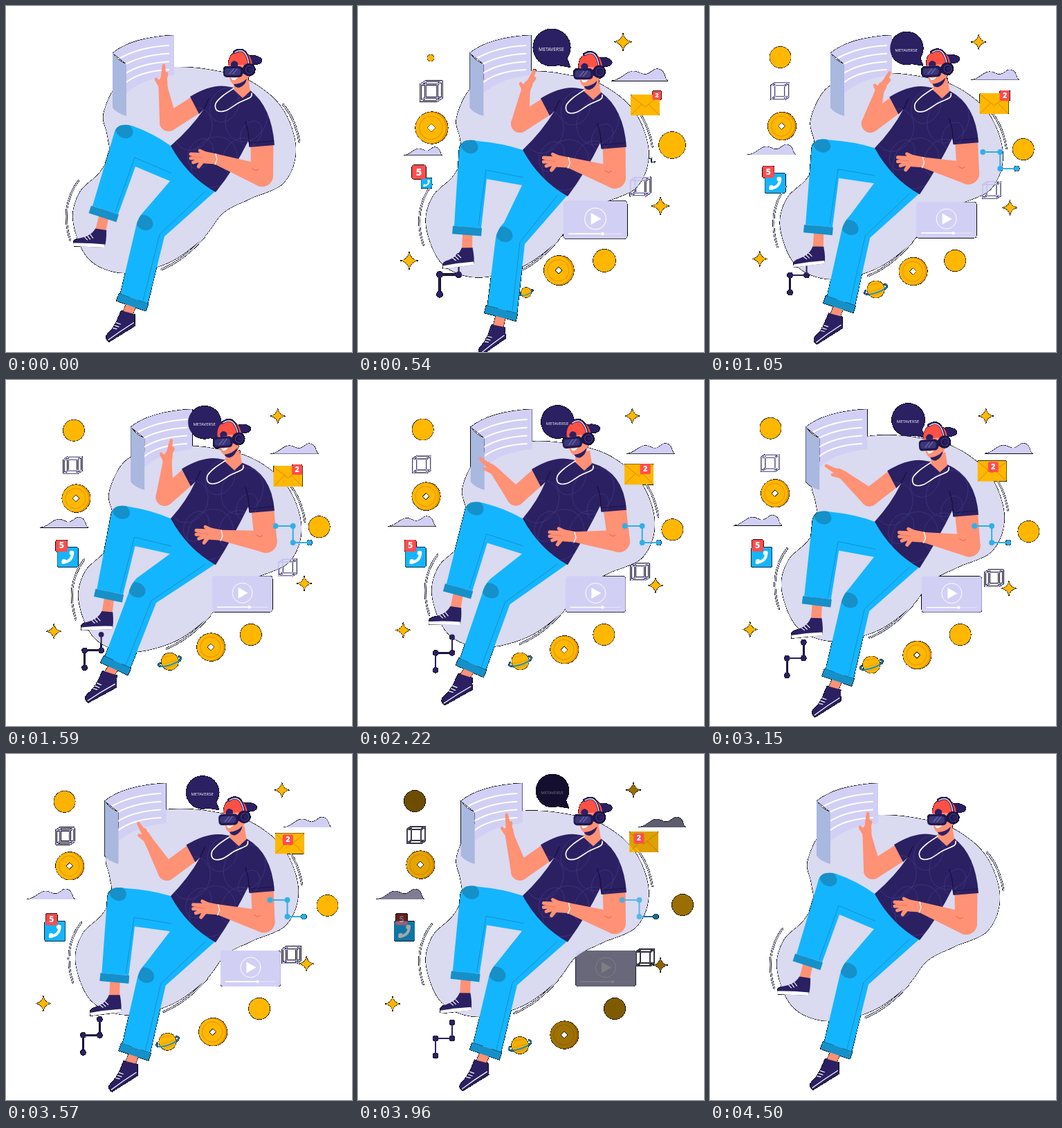
These frames come from a looping animation (500x500 px, 4530 ms). An HTML page with a canvas:

```html
<!DOCTYPE html>
<html lang="en">
<head>
<meta charset="utf-8">
<style>
html, body { margin: 0; width: 100%; height: 100%; overflow: hidden; background: #fff; }
canvas { display: block; width: 500px; height: 500px; }
</style>
</head>
<body>
<canvas id="stage" width="500" height="500"></canvas>
<script>
const LOOP = 4530, CYCLE = 4500, STEP = 30, SIZE = 500;
const ENTER = 540, LEAVE = 3960;
const POSES = [0, 540, 1590, 2220, 3150, 3960, CYCLE];
const NAVY = '#2b2062', DARK = '#17103f', SKIN = '#ff9175', BLUE = '#14b5ff', TEAL = '#1590c8',
  AMBER = '#ffb700', RUST = '#e89a00', RED = '#ff4d4d', LILAC = '#d2cff5', WHITE = '#fff';

const out = document.getElementById('stage').getContext('2d');
const makeLayer = () => {
  const cv = document.createElement('canvas');
  cv.width = cv.height = SIZE;
  return cv.getContext('2d', { willReadFrequently: true });
};
const scene = makeLayer(), layer = makeLayer();
let c = scene, now = 0;
// sway: slow lean to the left and back, bob: up and down,
// drop: near leg sinking, kick: far leg swinging, reach: arm stretching to the page
let sway, bob, drop, kick, reach;

// ---- motion ----
const clamp = u => Math.max(0, Math.min(1, u));
const ease = u => { u = clamp(u); return u * u * (3 - 2 * u); };

// Smooth periodic curve that starts from rest value 0 and passes through one value per pose.
function through(...keys) {
  const v = [0, ...keys, 0], n = POSES.length - 1;
  let i = 0;
  while (i < n - 1 && now >= POSES[i + 1]) i++;
  const span = k => POSES[k + 1] - POSES[k], slope = k => (v[k + 1] - v[k]) / span(k);
  const tangent = k => {
    const a = (k - 1 + n) % n, b = k % n;
    return (slope(a) * span(b) + slope(b) * span(a)) / (span(a) + span(b));
  };
  const u = (now - POSES[i]) / span(i), w = 1 - u;
  return v[i] * w * w * (1 + 2 * u) + v[i + 1] * u * u * (3 - 2 * u)
    + span(i) * u * w * (tangent(i) * w - tangent(i + 1) * u);
}
function move(t) {
  now = t;
  const turn = 2 * Math.PI * t / CYCLE;
  sway = (1 - Math.cos(turn)) / 2;
  bob = Math.sin(turn);
  drop = through(1, .45, .2, .8, .85);
  kick = through(1, -1, -.8, .1, .08);
  reach = through(-.45, -.18, .85, 1, .22);
}
const add = (p, x, y) => [p[0] + x, p[1] + y];
const mid = (a, b) => [(a[0] + b[0]) / 2, (a[1] + b[1]) / 2];
const shifted = (dx, dy) => (x, y) => [x + dx, y + dy];

// ---- drawing helpers ----
function fill(color) { c.fillStyle = color; c.fill(); }
function stroke(color, w) {
  c.strokeStyle = color; c.lineWidth = w;
  c.lineCap = c.lineJoin = 'round';
  c.stroke();
}
function trace(pts, closed) {
  c.beginPath();
  pts.forEach(p => c.lineTo(...p));
  if (closed) c.closePath();
}
const poly = (pts, color) => { trace(pts, true); fill(color); };
const line = (pts, color, w) => { trace(pts); stroke(color, w); };
function disc(x, y, r, color) { c.beginPath(); c.arc(x, y, r, 0, 7); fill(color); }
function ring(x, y, r, color, w) { c.beginPath(); c.arc(x, y, r, 0, 7); stroke(color, w); }
function oval(x, y, rx, ry, a, color) { c.beginPath(); c.ellipse(x, y, rx, ry, a, 0, 7); fill(color); }
function box(x, y, w, h, r, color) { c.beginPath(); c.roundRect(x, y, w, h, r); fill(color); }
const shape = (d, color) => { c.fillStyle = color; c.fill(new Path2D(d)); };
function wire(d, color, w) {
  c.strokeStyle = color; c.lineWidth = w; c.lineCap = c.lineJoin = 'round';
  c.stroke(new Path2D(d));
}
function smooth(pts, closed) {
  const n = pts.length;
  const get = i => closed ? pts[(i + n) % n] : pts[Math.max(0, Math.min(n - 1, i))];
  c.beginPath();
  c.moveTo(...pts[0]);
  for (let i = 0; i < (closed ? n : n - 1); i++) {
    const [a, b, d, e] = [get(i - 1), get(i), get(i + 1), get(i + 2)];
    c.bezierCurveTo(b[0] + (d[0] - a[0]) / 6, b[1] + (d[1] - a[1]) / 6,
      d[0] - (e[0] - b[0]) / 6, d[1] - (e[1] - b[1]) / 6, ...d);
  }
}
function limb(a, ra, b, rb) {
  const dir = Math.atan2(b[1] - a[1], b[0] - a[0]), q = Math.PI / 2;
  c.beginPath();
  c.arc(...a, ra, dir + q, dir + 3 * q);
  c.arc(...b, rb, dir - q, dir + q);
  fill(SKIN);
}
function label(s, x, y, font) {
  c.font = font; c.fillStyle = WHITE;
  c.textAlign = 'center'; c.textBaseline = 'middle';
  c.fillText(s, x, y);
}
function within(x, y, draw) { c.save(); c.translate(x, y); draw(); c.restore(); }

// ---- backdrop ----
function blob() {
  smooth([[141, 155], [162, 112], [200, 94], [245, 88], [295, 92], [350, 107], [398, 146], [419, 205],
    [402, 255], [352, 279], [314, 299], [285, 335], [235, 371], [170, 386], [120, 366], [97, 312],
    [106, 270], [135, 241], [149, 213], [146, 185]], true);
  fill('#dadaf1');
  wire('M400 142Q418 162 424 197M105 252Q77 290 93 339M224 381Q258 367 287 333', '#dadaf1', 2);
}
function book() {
  shape('M154 68Q182 45 243 42V100Q198 104 174 126V84Z', LILAC);
  for (let i = 0; i < 4; i++) {
    const y = i * 11.7;
    wire(`M${165 + i * 3} ${75 + y}Q195 ${59 + y} 235 ${57 + y}`, WHITE, 2);
  }
  shape('M154 67Q160 78 174 84V159Q160 155 154 147Z', '#a9b8df');
}

// ---- floating items, drawn around their own centre ----
const plainCoin = () => disc(0, 0, 15.5, AMBER);
const holedCoin = () => {
  disc(.7, 0, 20.3, RUST);
  disc(-1.2, 0, 19, AMBER);
  ring(-.5, 0, 14.5, RUST, 1.2);
  c.globalCompositeOperation = 'destination-out';
  poly([[-5, 0], [0, -5], [5, 0], [0, 5]], '#000');
  c.globalCompositeOperation = 'source-over';
};
const star = () => shape('M0-11Q1.5-1.5 11 0Q1.5 1.5 0 11Q-1.5 1.5-11 0Q-1.5-1.5 0-11Z', AMBER);
const cube = () => wire('M-13-8H7V12H-13ZM-7-12H13V8H-7ZM-13-8L-7-12M7-8L13-12M7 12L13 8M-13 12L-7 8', '#c6c1f0', 1.6);
const cloud = () => shape('M-35 7C-22 6-18-4-8-5C0-5 3 1 10-2C17-5 18-10 25-7C32-4 30 4 35 7Z', LILAC);
const badge = (s, size) => () => {
  box(-size / 2, -size / 2, size, size, 2, RED);
  label(s, 0, .6, `800 ${size * .72}px "Open Sans", sans-serif`);
};
const phone = () => {
  box(-15, -14.5, 30, 29, 2.5, BLUE);
  wire('M7-7Q7 6-7 8', WHITE, 4);
  disc(5.5, -6, 3.2, WHITE);
  disc(-5.5, 6, 3.2, WHITE);
};
const planet = () => {
  disc(0, 0, 12.5, AMBER);
  wire('M-9-6L5-9M-10 4L9-2M-5 10L9 5', RUST, 1);
  c.beginPath();
  c.ellipse(0, 0, 17, 5, -.33, -.55, 3.7);
  stroke(TEAL, 2);
};
const video = () => {
  box(-43.5, -26, 87, 52, 4, LILAC);
  ring(0, -1.5, 14.5, WHITE, 1);
  poly([[-6, -9.5], [8, -1.5], [-6, 6.5]], WHITE);
  line([[-36, 19], [36, 19]], '#e6e4fb', 1.2);
  line([[-36, 19], [10, 19]], WHITE, 1.6);
  disc(10, 19, 2.2, WHITE);
};
const mail = () => {
  box(-21, -15, 42, 30, 1.5, AMBER);
  wire('M-20-13L0 3L20-13M-20 14L-5-1M20 14L5-1', '#d48c00', 1);
};
const circuit = (pts, color) => () => {
  line(pts, color, 2);
  pts.forEach(p => disc(...p, 3.9, color));
};
const stairs = circuit([[24, -23], [24, 0], [0, 0], [0, 25]], NAVY);
const link = circuit([[-24.5, -12], [.5, -12], [.5, 12], [24.5, 12]], '#2fafe9');
const bubble = () => {
  disc(0, 0, 24, NAVY);
  poly([[4, 22], [24, 25.5], [19, 12]], NAVY);
  label('METAVERSE', -.5, 3, '6px "Open Sans", sans-serif');
};

// Grows to `pop`, settles at 1, drifts by (dx, dy) along an arc bent by (bx, by);
// `fade` is the opacity left when the exit begins.
function item(draw, pop, fade, x, y, dx, dy, bx = 0, by = 0) {
  const start = pop < .7 ? 420 : 200;
  const size = now < ENTER ? pop * ease((now - start) / (ENTER - start))
    : pop + (1 - pop) * ease((now - ENTER) / 300);
  const alpha = clamp(Math.min(fade - (now - LEAVE) / 700, (CYCLE - 30 - now) / 200));
  if (size <= 0 || alpha <= 0) return;
  const u = Math.max(0, (now - ENTER) / (LEAVE - ENTER)), bend = 4 * u * (1 - u);
  c = layer;
  c.clearRect(0, 0, SIZE, SIZE);
  within(x + dx * u + bx * bend, y + dy * u + by * bend, () => { c.scale(size, size); draw(); });
  c = scene;
  c.globalAlpha = Math.sqrt(alpha);
  c.drawImage(layer.canvas, 0, 0);
  c.globalAlpha = 1;
}
function items() {
  item(plainCoin, .33, .43, 105, 75, -23, -7);
  item(cube, 1.2, .5, 106, 123, -22, -6, -3, 2);
  item(holedCoin, 1.15, .9, 106, 176, -16, -16);
  item(cloud, .8, .6, 94, 210, -33, -7, 0, -2);
  item(star, 1.17, 1, 74, 368, -24, -7, 3, -3);
  item(phone, .52, .65, 99, 256, -32, 0);
  item(badge('5', 17), 1.2, .4, 88, 240, -25, -1);
  item(stairs, 1.15, 1, 118, 388, -6, 23, -3, -5);
  item(planet, .6, .95, 243, 414, -9, 7, -4, -11);
  item(holedCoin, 1.06, .62, 290, 382, 8, 24, 4, -4);
  item(plainCoin, 1.06, .5, 356, 368, 15, 0, -8);
  item(video, 1.06, .5, 343, 309, 15, 1, -7);
  item(cube, 1.1, .4, 408, 261, 7, 33, -4);
  item(star, 1.2, .55, 437, 289, 0, 16, -7);
  item(plainCoin, 1.25, .6, 454, 201, 15, 17, -7, 7);
  item(mail, 1, .88, 415, 143, -2, -16, -8, 1);
  item(badge('2', 15), .87, 1, 432, 129, -26, -7, -4, 3);
  item(cloud, 1.18, .45, 407, 100, 32, -1);
  item(star, 1.15, .6, 383, 52, 15, 0, 6);
  item(bubble, 1.13, .47, 280, 60, 1, -7, 8, 4);
}

// ---- figure ----
// A joint at rest in (x, y) that travels by (dx, dy) as k goes from 0 to 1.
const swing = (k, x, y, dx, dy) => [x + k * dx, y + k * dy];

// Sole runs from heel to toe; back and front are the collar ends in shoe space.
function foot(shin, toe, heel, back, front, sole) {
  const ux = (toe[0] - heel[0]) / 45, uy = (toe[1] - heel[1]) / 45;
  const [x, y] = mid(back, front);
  limb(shin, 7, [heel[0] + x * ux + y * uy, heel[1] + x * uy - y * ux], 7.5);
  c.save();
  c.transform(ux, uy, uy, -ux, ...heel);
  shape(`M0 0Q-3-7 ${back}L${front}Q17-21 23-17Q30-13 40-11Q48-8 44 0Z`, NAVY);
  if (sole) shape('M-.5 0V-4.500Q22-6 45-4.500V0Z', WHITE);
  else wire('M0-5Q22-5 43-3', WHITE, 1.2);
  wire('M17-13L21-18M21-11L25-16M25-10L29-14', WHITE, 1.2);
  c.restore();
}
function cuff(a, b) {
  const dx = b[0] - a[0], dy = b[1] - a[1], k = 1 / Math.hypot(dx, dy);
  const drape = p => add(p, -dy * k * 11.5, dx * k * 11.5);
  const l = add(a, -dx * k * 2, -dy * k * 2), r = add(b, dx * k, dy * k);
  poly([l, r, drape(r), drape(l)], TEAL);
}
function kneePatch(x, y) {
  c.save();
  c.clip();
  oval(x, y, 13, 10.5, .5, TEAL);
  c.restore();
}
function nearLeg(hem) {
  const knee = swing(drop, 160, 174, -10, 22), inner = swing(drop, 187, 232, -1, 18);
  const a = swing(drop, 125, 289, 14, 29), b = swing(drop, 162, 301, 16, 20);
  foot(mid(a, b), swing(drop, 97, 347, 26, 33), swing(drop, 142, 349, 25, 25), [-2, -25], [14, -27], true);
  c.beginPath();
  c.moveTo(...hem(246, 204));
  c.lineTo(...hem(238, 202));
  c.quadraticCurveTo(...add(mid(hem(238, 202), knee), 14, -4), ...add(knee, 22, -1));
  c.quadraticCurveTo(...add(knee, -1, -6), ...add(knee, -4, 11));
  [a, b, inner, hem(237, 253), hem(280, 250)].forEach(p => c.lineTo(...p));
  fill(BLUE);
  kneePatch(...add(knee, 11, 6));
  line([add(b, -4, -4), add(inner, -1, -13), hem(240, 242)], TEAL, 1);
  cuff(a, b);
}
function farLeg(hem) {
  const outer = add(swing(kick, 192, 304, 11, 12), 0, 5 * drop), back = swing(kick, 229, 333, 12, 11);
  const a = swing(kick, 165, 416, 22, 17), b = swing(kick, 205, 430, 25, 14);
  foot(mid(a, b), swing(kick, 148, 486, 30, 19), swing(kick, 187, 462, 27, 18), [-8, -14], [6, -29], false);
  c.beginPath();
  c.moveTo(...hem(246, 208));
  c.lineTo(...hem(237, 253));
  c.lineTo(...add(outer, 8, -8));
  c.quadraticCurveTo(...add(outer, -1, 1), ...add(outer, -4, 14));
  [a, b, back, hem(302, 268)].forEach(p => c.lineTo(...p));
  fill(BLUE);
  kneePatch(...add(outer, 8, 9));
  line([add(b, -7, -4), add(back, -7, -3), hem(288, 268)], TEAL, 1);
  cuff(a, b);
}
function pointingArm(sleeve) {
  const arc = (x, y, dx, dy) => [x - dx * reach, y + dy * reach * reach];
  const elbow = [235 - 7 * sway, 168 + 2 * drop];
  const wrist = arc(227, 118, 34, 20), tip = arc(228, 86, 60, 38), thumb = arc(217, 106, 40, 31);
  limb(sleeve, 13, elbow, 13);
  limb(elbow, 13, wrist, 6.5);
  const palm = add(wrist, (tip[0] - wrist[0]) * .3, (tip[1] - wrist[1]) * .3);
  limb(wrist, 6.5, palm, 6);
  limb(palm, 4.2, tip, 2.3);
  limb(wrist, 5, thumb, 2.3);
  limb(palm, 4.5, add(mid(palm, tip), 4, 1), 2.8);
}
function restingHand(w) {
  const palm = add(w, -15, -2);
  limb(w, 7.5, palm, 8.5);
  for (let i = 0; i < 4; i++) {
    limb(add(palm, -3, i * 2 - 3), 3.8, add(w, 3 * i * (i - 1) / 1.6 - 36, i * 6 - 7), 2.5);
  }
  limb(add(palm, 0, -5), 3.5, add(w, -23, -12), 2.4);
  line([w, add(w, 0, -1)].map(p => add(p, -20, -1)).concat([add(w, -33, -3)]), '#e8705c', .8);
  line([add(w, 0, -7), add(w, 2, 1), add(w, -1, 8)], WHITE, 1.3);
}
function shirt(n, h, r) {
  c.beginPath();
  c.moveTo(...n(318, 116));
  c.quadraticCurveTo(...n(296, 113), ...n(266, 131));
  c.lineTo(...n(279, 156));
  c.lineTo(...n(286, 149));
  c.quadraticCurveTo(...mid(n(267, 176), h(267, 178)), ...h(238, 202));
  c.quadraticCurveTo(...h(262, 246), ...h(303, 269));
  c.quadraticCurveTo(...r(330, 236), ...r(350, 195));
  c.lineTo(...r(352, 204));
  c.lineTo(...r(388, 201));
  c.quadraticCurveTo(...r(384, 146), ...n(353, 122));
  c.closePath();
  fill(NAVY);
  c.save();
  c.clip();
  for (let i = 0; i < 7; i++) {
    const x = 312 + 42 * Math.cos(i * 2.4), y = 185 + 42 * Math.sin(i * 2.4);
    c.beginPath();
    c.ellipse(...mid(n(x, y), h(x, y)), 14 + i * 3, 20 + i * 3, .5, 0, 7);
    stroke('#463b86', .7);
  }
  c.restore();
  line([r(346, 167), r(350, 182), r(352, 203)], DARK, 1.2);
  line([n(293, 134), n(286, 149)], DARK, 1.2);
  line([r(353, 198), r(387, 195)], DARK, .8);
}
function head() {
  within(338 - 18.5 * sway, 95 - 3 * sway + 3.5 * kick, () => {
    c.rotate(-.1 * sway);
    oval(20, -17, 12, 6.5, .1, NAVY);
    shape('M-16-10L-15 9Q-13 18-6 20Q8 20 14 5V-12Z', SKIN);
    shape('M-9 18Q2 18 10 10Q8 20-1 23Q-7 23-9 18Z', NAVY);
    shape('M-13 8Q-8 10-3 8Q-6 13-11 12Z', WHITE);
    shape('M-17-9Q-17-29 1-30Q18-28 18-6L4-10Z', '#ff5145');
    shape('M-13-12Q-9-19-3-13V-8H-13Z', NAVY);
    wire('M-8-28Q10-39 14-8', NAVY, 4);
    wire('M-7-28Q9-37 13-11', WHITE, 1.2);
    box(0, -6, 14, 9, 1, NAVY);
    box(-24, -8, 28, 16, 5, '#211850');
    box(-22, -5, 23, 10, 4, '#3a3678');
    wire('M-15 3L-9-4M-10 3L-4-4', '#6763a8', 1.5);
    disc(13, -3, 9.3, '#1d1548');
    ring(14, -3, 5.5, '#4a4392', 1);
    disc(15, -3, 3, NAVY);
  });
}
function figure() {
  const neck = shifted(-15 * sway, 2.5 * kick);
  const hem = shifted(0, 3 * (kick + drop));
  const sleeve = shifted(0, 4 * kick - 10 * sway);
  nearLeg(hem);
  farLeg(hem);
  pointingArm(neck(274, 143));
  const elbow = [370 + 7 * sway, 245 + 4 * kick - 9 * sway];
  const wrist = [303 + 10 * sway, 221 + 4 * kick + 9 * sway];
  limb(sleeve(370, 192), 16.5, elbow, 16);
  shirt(neck, hem, sleeve);
  limb(elbow, 16, wrist, 7.5);
  restingHand(wrist);
  line([add(elbow, -14, -10), add(elbow, -9, -7), add(elbow, -5, -9)], '#e8604f', 1);
  poly([neck(329, 108), neck(350, 104), neck(353, 123), neck(342, 133), neck(329, 121)], SKIN);
  smooth([neck(329, 119), neck(313, 130), neck(303, 141), neck(305, 151), neck(318, 151),
    neck(336, 140), neck(353, 132), neck(355, 126)]);
  stroke(WHITE, 1.7);
  head();
}

// Soft edges and fading parts settle on a black matte with a hard cut-out.
function matte() {
  const img = scene.getImageData(0, 0, SIZE, SIZE), d = img.data;
  for (let i = 0; i < d.length; i += 4) {
    const a = d[i + 3] / 255;
    if (a < .06) d[i] = d[i + 1] = d[i + 2] = 255;
    else if (a < 1) for (let k = 0; k < 3; k++) d[i + k] *= a * a;
    d[i + 3] = 255;
  }
  out.putImageData(img, 0, 0);
}
function frame() {
  move(Math.floor(performance.now() % LOOP / STEP) * STEP);
  c = scene;
  c.clearRect(0, 0, SIZE, SIZE);
  within(10 * sway, 9 * bob, blob);
  within(18 * bob + 7.5 * sway - 6 * Math.sin(4 * Math.PI * now / CYCLE), 0, book);
  items();
  figure();
  item(link, .2, .6, 424, 223, -18, 0, -5);
  matte();
  requestAnimationFrame(frame);
}
frame();
</script>
</body>
</html>
```
